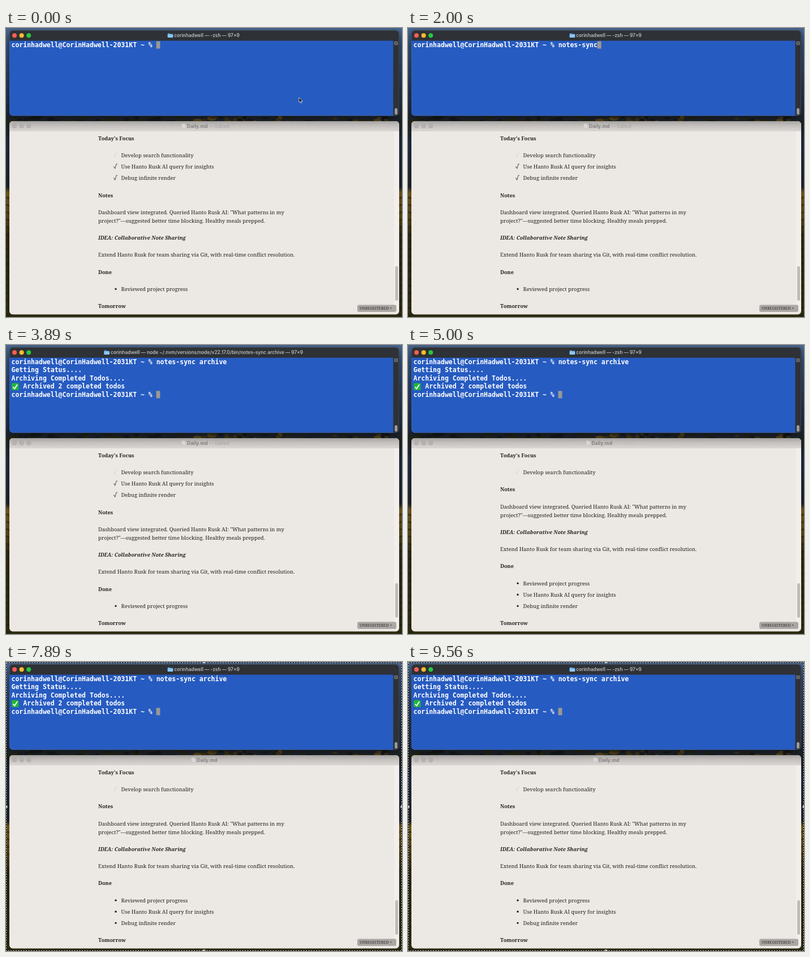
An HTML page that plays this animation: 700 by 512 pixels, repeating every 9.67 s.

```html
<!DOCTYPE html>
<html lang="en">
<head>
<meta charset="utf-8">
<title>Archive todos</title>
<style>
  html, body { margin: 0; width: 100%; height: 100%; overflow: hidden; background: #1b1b12; }
  svg { display: block; }
  text { white-space: pre; }
  .title { font: 600 8.3px Inter, sans-serif; }
  .file { font: 700 8.5px Inter, sans-serif; }
  .mono { font: 700 11.5px "DejaVu Sans Mono", monospace; fill: #fff; }
  .doc text { font: 9.36px "Noto Serif", serif; fill: #24211f; }
  .doc .b { font-weight: 700; font-size: 9.15px; }
  .doc .bi { font-weight: 700; font-style: italic; font-size: 9.05px; }
  .badge { font: 6.8px "Noto Serif", serif; fill: #2b2927; }
  #terminal { filter: drop-shadow(0 4px 6px rgba(0, 0, 0, .45)); }
</style>
</head>
<body>
<svg width="700" height="512" viewBox="0 0 700 512">
  <defs>
    <linearGradient id="land" x2="0" y2="1">
      <stop offset="0" stop-color="#4a6892"/>
      <stop offset=".06" stop-color="#34507a"/>
      <stop offset=".28" stop-color="#1e2c44"/>
      <stop offset=".33" stop-color="#1b1f1e"/>
      <stop offset=".4" stop-color="#1c273a"/>
      <stop offset=".55" stop-color="#1c2026"/>
      <stop offset=".57" stop-color="#66501a"/>
      <stop offset=".66" stop-color="#4d3f14"/>
      <stop offset=".72" stop-color="#2a2610"/>
      <stop offset="1" stop-color="#2b2a10"/>
    </linearGradient>
    <linearGradient id="bar" x2="0" y2="1">
      <stop offset="0" stop-color="#b0adac"/>
      <stop offset="1" stop-color="#d9d6d3"/>
    </linearGradient>
  </defs>

  <rect width="700" height="512" fill="url(#land)"/>
  <g id="foliage"></g>

  <g id="editor">
    <rect x="6" y="165" width="689" height="342.5" rx="6" fill="#ece8e4"/>
    <path d="M6 182.500V171a6 6 0 0 1 6-6H689a6 6 0 0 1 6 6V182.500Z" fill="url(#bar)"/>
    <path d="M6 182.500H695" stroke="#d2cfcc" stroke-width=".6"/>
    <g id="idleLights" fill="#b5b2b0" stroke="#a19e9c" stroke-width=".5"></g>
    <rect x="686" y="183" width="8.500" height="319" fill="#f1eeeb"/>
    <rect x="688" y="422" width="5" height="61" rx="2.500" fill="#bebbb8"/>
    <g id="fileTitle">
      <path d="M-9.500 169.500h5l2.500 2.500v5.500h-7.500z" fill="#d9d6d4" stroke="#c0bdba" stroke-width=".5"/>
      <text class="file" y="176.500" fill="#858280">Daily.md</text>
      <text class="title" id="edited" x="39" y="176.500" fill="#aeabA8">— Edited</text>
    </g>
    <g class="doc" id="before"></g>
    <g class="doc" id="after"></g>
    <rect x="621" y="490.500" width="69" height="12.500" rx="3" fill="#aaa7a5"/>
    <text class="badge" x="625" y="499.200">UNREGISTERED ×</text>
  </g>

  <g id="terminal">
    <rect x="6" y="4" width="689" height="151.500" rx="6" fill="#2e3135"/>
    <path d="M6 22.500H684.500V155.500H12a6 6 0 0 1-6-6Z" fill="#265bc1"/>
    <rect x="6.300" y="4.300" width="688.400" height="150.900" rx="6" fill="none" stroke="#777b82" stroke-opacity=".6" stroke-width=".6"/>
    <g id="lights"></g>
    <path d="M687 24.500h5v5h-5zM687 27h5" fill="none" stroke="#a3a5a8" stroke-width=".8"/>
    <rect x="687" y="142" width="5" height="11.500" rx="2.500" fill="#97999c"/>
    <g id="folder">
      <path d="M0 10.500q0-1 1-1h2.500l1 1H8.500q1 0 1 1v4.500q0 1-1 1H1q-1 0-1-1z" fill="#5fa9e6"/>
      <rect y="11.500" width="9.500" height="5.500" rx="1" fill="#8cc5f3"/>
    </g>
    <text class="title" id="shellTitle" x="355" y="16" text-anchor="middle" fill="#b9bbbd"></text>
    <g id="screen"></g>
    <g id="tick">
      <rect x="10" y="67.500" width="12.500" height="12.500" rx="2" fill="#20b63a"/>
      <path d="M12.500 74.500l2.800 3 4.700-7.500" fill="none" stroke="#fff" stroke-width="1.900"/>
    </g>
    <rect id="caret" width="6.900" height="13" fill="#999894"/>
  </g>

  <path id="pointer" d="M518 123v8.800l2-1.800 1.300 3.200 1.500-.6-1.400-3.100h2.800z" fill="#111" stroke="#fff" stroke-width=".7"/>
  <g id="selection">
    <rect x=".5" y="1" width="699" height="510.500" fill="none" stroke="#111"/>
    <rect x=".5" y="1" width="699" height="510.500" fill="none" stroke="#ddd" stroke-dasharray="2 2.500"/>
    <g fill="#c4c4c2" stroke="#555" stroke-width=".5">
      <circle cy="256.500" r="2.800"/><circle cx="700" cy="256.500" r="2.800"/>
      <circle cx="350" cy="512" r="2.800"/><circle cx="350" r="2.800"/>
    </g>
  </g>
</svg>
<script>
const LOOP = 9670, CELL = 6.92, LEFT = 9.5, LINE = 14.45;
const $ = id => document.getElementById(id);

function add(parent, tag, attrs, text = '') {
  const el = document.createElementNS('http://www.w3.org/2000/svg', tag);
  for (const key in attrs) el.setAttribute(key, attrs[key]);
  el.textContent = text;
  parent.append(el);
  return el;
}

// Wallpaper: autumn trees on the horizon, faint vineyard rows below
let seed = 7;
const random = () => (seed = seed * 16807 % 2147483647) / 2147483647;
const trees = ['#15191a', '#232415', '#3b3217', '#54431a'];
for (let i = 0; i < 90; i++) {
  const right = random() < .6;
  add($('foliage'), 'ellipse', {
    cx: right ? 330 + random() * 370 : random() * 330,
    cy: 158 + random() * 10, rx: 3 + random() * 6, ry: 1.5 + random() * 3,
    fill: trees[Math.floor(random() * (right ? 4 : 2))]
  });
}
for (let y = 300; y < 512; y += 13)
  add($('foliage'), 'path', { d: `M0 ${y}l6 2M694 ${y + 2}l6-2`, stroke: '#1d1b0c', 'stroke-width': 3, opacity: .5 });

// Window buttons
['#ff5f57', '#febc2e', '#28c840'].forEach((fill, i) => {
  const cx = 15 + i * 12.6;
  add($('lights'), 'circle', { cx, cy: 13.2, r: 4, fill });
  add($('idleLights'), 'circle', { cx, cy: 173.5, r: 3.8 });
});

// Note contents, before and after archiving
const todos = ['Use Hanto Rusk AI query for insights', 'Debug infinite render'];
function buildNote(group, archived) {
  const write = (x, y, text, cls = '') => add(group, 'text', { x, y, class: cls }, text);
  const check = (y, stroke) => add(group, 'path', {
    d: `M190 ${y - 3}l1-.6 1.700 3.600 2.300-8.200h2`, fill: 'none', stroke, 'stroke-width': .8
  });
  const bullet = (y, text) => {
    add(group, 'circle', { cx: 194, cy: y - 3.3, r: 1.7, fill: '#24211f' });
    write(203.5, y, text);
  };
  write(163, 199, "Today's Focus", 'b');
  check(229, '#d8d4d0');
  write(203.5, 229, 'Develop search functionality');
  if (!archived) todos.forEach((text, i) => {
    const y = 249.2 + i * 20.2;
    check(y, '#24211f');
    write(203.5, y, text);
  });
  const top = archived ? 259.3 : 299.5;
  write(163, top, 'Notes', 'b');
  write(163, top + 30.2, 'Dashboard view integrated. Queried Hanto Rusk AI: "What patterns in my');
  write(163, top + 45.4, 'project?"—suggested better time blocking. Healthy meals prepped.');
  write(163, top + 75.5, 'IDEA: Collaborative Note Sharing', 'bi');
  write(163, top + 105.7, 'Extend Hanto Rusk for team sharing via Git, with real-time conflict resolution.');
  write(163, top + 136, 'Done', 'b');
  ['Reviewed project progress', ...(archived ? todos : [])]
    .forEach((text, i) => bullet(top + 166.2 + i * 20.1, text));
  write(163, 495.7, 'Tomorrow', 'b');
}
buildNote($('before'), false);
buildNote($('after'), true);

// Terminal session
const user = 'corinhadwell';
const prompt = user + '@CorinHadwell-2031KT ~ % ';
const command = 'notes-sync archive';
const output = [
  [3220, 'Getting Status....'],
  [3330, 'Archiving Completed Todos....'],
  [3660, '   Archived 2 completed todos'],
  [3780, prompt]
];
const rows = Array.from({ length: 5 }, (_, i) =>
  add($('screen'), 'text', { class: 'mono', x: LEFT, y: 34 + i * LINE }));

function setText(el, text) {
  if (el.textContent !== text) el.textContent = text;
}
const show = (id, on) => $(id).style.display = on ? '' : 'none';
const clamp = v => Math.max(0, Math.min(1, v));

function draw(t) {
  const typed = Math.floor(clamp((t - 950) / 1000) * 10 + clamp((t - 2100) / 800) * 8);
  const lines = [prompt + command.slice(0, typed), ...output.filter(o => t >= o[0]).map(o => o[1])];
  rows.forEach((row, i) => setText(row, lines[i] || ''));

  const waiting = t >= 3100 && lines.length === 1;
  const row = waiting ? 1 : lines.length - 1;
  const column = waiting ? 0 : lines[row].length;
  $('caret').setAttribute('x', LEFT + column * CELL);
  $('caret').setAttribute('y', 23.5 + row * LINE);

  const running = t >= 3110 && t < 4110;
  const job = running ? 'node ~/.nvm/versions/node/v22.17.0/bin/notes-sync archive' : '-zsh';
  setText($('shellTitle'), `${user} — ${job} — 97×9`);
  const half = $('shellTitle').getComputedTextLength() / 2;
  $('folder').setAttribute('transform', `translate(${343.5 - half})`);

  const archived = t >= 4890;
  const p = clamp((t - 4890) / 330);
  $('fileTitle').setAttribute('transform', `translate(${320 + 17 * p * p * (3 - 2 * p)})`);
  $('edited').setAttribute('opacity', clamp(1 - p * 2.4));

  show('before', !archived);
  show('after', archived);
  show('tick', t >= 3660);
  show('pointer', t < 950);
  show('selection', t >= 7450);
}

function frame() {
  draw(performance.now() % LOOP);
  requestAnimationFrame(frame);
}
frame();
</script>
</body>
</html>
```
